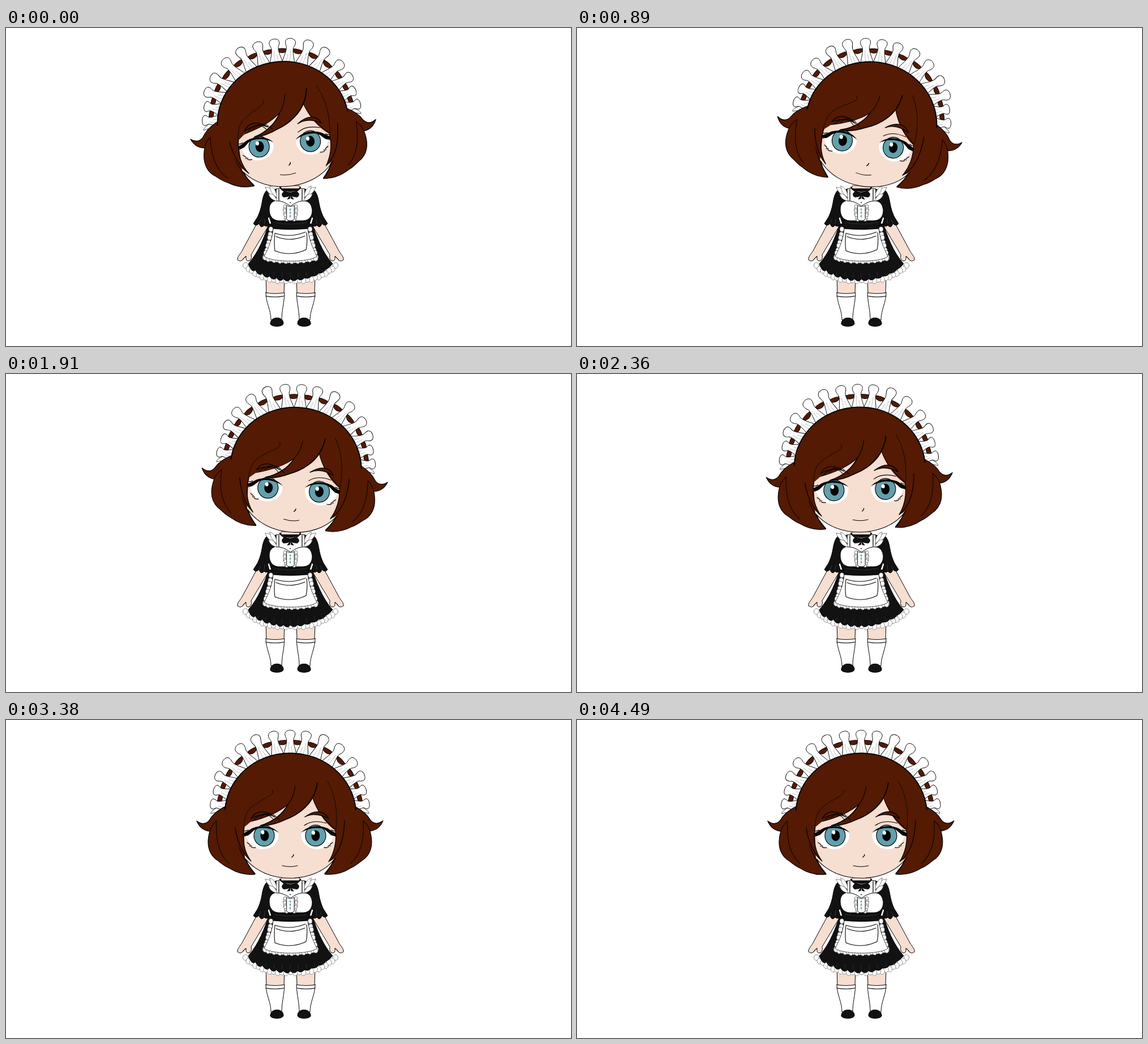
These frames come from a looping animation (998x561 px, 4550 ms). An HTML page:

```html
<!DOCTYPE html>
<html lang="en">
<head>
<meta charset="utf-8">
<title>Maid</title>
<style>
html, body { margin: 0; width: 100%; height: 100%; overflow: hidden; background: #fff; }
svg { display: block; width: 100vw; height: 100vh; }
</style>
</head>
<body>
<svg id="stage" viewBox="0 0 998 561" stroke-linecap="round" stroke-linejoin="round"></svg>
<script>
const BROWN = '#541a03', SKIN = '#f6ded1', TEAL = '#62a0ad', INK = '#060404', CLOTH = '#121212';

const shape = (d, fill, width = 0, stroke = INK) =>
  `<path d="${d}" fill="${fill}" stroke="${width ? stroke : 'none'}" stroke-width="${width}"/>`;
const line = (d, width = 1, stroke = INK) => shape(d, 'none', width, stroke);
const oval = (x, y, rx, ry, fill, width = 0) =>
  `<ellipse cx="${x}" cy="${y}" rx="${rx}" ry="${ry}" fill="${fill}" stroke="${width ? INK : 'none'}" stroke-width="${width}"/>`;
const flip = (sum, s) => `<g transform="translate(${sum}) scale(-1 1)">${s}</g>`;
const pair = (sum, s) => s + flip(sum, s);
const mix = (a, b, p) => [a[0] + (b[0] - a[0]) * p, a[1] + (b[1] - a[1]) * p];

// Scalloped strip along a quadratic curve
function ruffle(a, c, b, n, r, stroke) {
  let s = '';
  for (let i = 0; i <= n; i++) {
    const p = i / n;
    const [x, y] = mix(mix(a, c, p), mix(c, b, p), p);
    s += `<ellipse cx="${x.toFixed(1)}" cy="${(y + (i % 2) * 1.5).toFixed(1)}" rx="${r}" ry="${r * 1.15}" fill="#fff" stroke="${stroke}" stroke-width=".8"/>`;
  }
  return s;
}

// Headband: base and tip of each fold, from the top down to the left
const folds = [
  [[502, 60], [502, 18]], [[480, 62], [471, 20]], [[458, 69], [438, 27]], [[437, 80], [409, 44]],
  [[420, 96], [384, 71]], [[405, 113], [370, 96]], [[396, 132], [367, 122]], [[390, 152], [361, 147]]
];

function fold([b, t]) {
  const L = Math.hypot(t[0] - b[0], t[1] - b[1]);
  const turn = Math.atan2(t[0] - b[0], b[1] - t[1]) * 180 / Math.PI;
  const y = k => (-k * L).toFixed(1);
  const d = `M-11 0C-9 ${y(.25)} -6 ${y(.4)} -6 ${y(.58)}C-6 ${y(.68)} -9 ${y(.7)} -9 ${y(.84)}` +
    `C-9 ${y(1.04)} 8 ${y(1.06)} 9 ${y(.86)}C9 ${y(.72)} 6 ${y(.7)} 6 ${y(.58)}C6 ${y(.4)} 9 ${y(.25)} 11 0`;
  return `<g transform="translate(${b}) rotate(${turn})">${shape(d, '#fff', .9)}` +
    line(`M-2 ${y(.05)}Q-3 ${y(.3)} -2 ${y(.5)}M4 ${y(.05)}L2 ${y(.34)}`, .5, '#888') + '</g>';
}

function gap(f, g) {
  const b = mix(f[0], g[0], .5), t = mix(f[1], g[1], .5), [x, y] = mix(b, t, .5);
  const turn = Math.atan2(t[0] - b[0], b[1] - t[1]) * 180 / Math.PI;
  return `<g transform="translate(${x} ${y}) rotate(${turn})">` +
    shape('M-9 -3Q0 -5 9 -3C9 6 -9 6 -9 -3Z', BROWN, 1) + '</g>';
}

function headband() {
  const side = folds.slice(1).map((f, i) => gap(folds[i], f)).join('') + folds.slice(1).map(fold).reverse().join('');
  const tail = shape('M384 148C366 158 361 162 362 165L370 163L368 168L377 165L386 172Z', '#fff', .7);
  return shape('M372 164C368 95 430 40 502 40C574 40 635 95 631 164Z', '#fff') +
    pair(1003, tail + side) + fold(folds[0]);
}

function eye() {
  return shape('M424 204C432 190 470 182 481 198C484 214 472 228 453 228C437 227 428 218 424 204Z', '#fff') +
    oval(456, 204, 18, 18.5, TEAL, 1.2) +
    shape('M415 200C422 200 428 195 435 191C448 185 470 185 482 199C470 191 452 188 441 193C434 197 431 203 426 204C422 205 418 203 415 200Z', INK) +
    line('M417 195Q423 197 428 194M421 205L427 202', 1.3) +
    line('M426 216L431 220M430 222L434 222M433 224Q437 226 441 225', 1.2);
}

function head() {
  const dome = 'M387 158C391 103 440 58.5 502 58.5C564 58.5 613 103 618 158';
  const halfBack = 'M502 60C440 60 392 104 388 152C372 160 364 168 359 177C352 185 344 183 337 178' +
    'C342 190 350 195 360 196C355 214 355 232 370 245C378 250 384 257 394 261C408 270 424 274 440 272C432 264 427 256 424 244L502 240Z';
  const curls = line('M372 178C370 210 375 236 394 253M360 196Q363 186 372 178', 1) +
    line('M402 180C404 208 414 240 440 271', 1.2);
  const jaw = 'M420 185L422 243C440 266 470 279 502 279C534 279 565 266 581 243L583 185L560 130L420 160Z';
  const front = dome + 'C615 185 612 200 604 215C596 232 585 243 570 250' +
    'C579 236 585 215 582 195C566 184 550 164 542 138C532 157 514 168 493 176C478 183 464 187 450 186' +
    'C470 180 488 167 498 149C483 162 460 172 433 179L421 189C416 212 422 235 433 249C415 235 405 215 400 190Z';
  const brow = 'M433 174C441 160 456 157 475 171C462 164 448 166 433 174Z';
  return headband() +
    pair(1003, shape(halfBack, BROWN, 1.2) + curls) +
    shape(jaw, SKIN) + line('M424 246C442 267 470 279 502 279C534 279 563 267 580 246', 1.1) +
    pair(1003, eye()) +
    oval(457, 204, 7.5, 9.5, INK) + oval(547, 204, 7.5, 9.5, INK) +
    oval(453.5, 198, 3, 3.6, '#fff') + oval(543, 199, 3, 3.6, '#fff') +
    line('M527 186Q542 175 566 182', 1.1) +
    shape(front, BROWN) +
    line(dome, 2) +
    line('M421 189C416 212 422 235 433 249C417 235 408 212 405 190M582 195C585 215 579 236 570 250C588 236 597 214 598 178', 1.3) +
    line('M550 111C546 143 521 166 493 176C478 183 464 187 450 186C472 180 490 165 498 149', 1.8) +
    line('M542 138Q552 168 582 193M511 117C509 132 505 141 498 149C483 162 460 172 433 179', 1.1) +
    line('M470 123C480 134 446 138 428 160Q420 172 420 195M568 108C582 134 586 160 583 193', .8) +
    pair(1003, shape(brow, BROWN, 1.4)) +
    line('M438 177Q452 161 472 166L483 176M448 173Q460 160 472 175', 1) +
    line('M508 237.5Q508 240 505 242', 1.5) +
    line('M488 257Q502 260.5 515 257', 1);
}

function body() {
  const arm = shape('M444 343L417 393C413 400 408 404 409 409Q414 413 418 409Q423 402 424 403' +
    'Q423 411 428 411Q435 410 433 400L463 350Z', SKIN, 1) +
    line('M418 409Q421 404 424 403', 1);
  const leg = shape('M459 436L460 470L491 470L492 436Z', SKIN, 1) +
    shape('M459 467Q475 470 492 467C491 488 487 498 487 515L468 515C468 497 459 485 459 467Z', '#fff', 1) +
    line('M459 473Q475 476 491 473', 1.2) +
    shape('M467 522C466 508 490 508 490 521C490 528 468 528 467 522Z', CLOTH, 1);
  const sleeve = shape('M470 283C458 282 454 296 452 309C450 320 447 328 444 334L437 345Q441 351 447 345Q450 355 456 348' +
    'Q461 353 465 345L462 335L472 330V300Z', CLOTH, 1) +
    line('M450 338Q448 342 447 345M457 337L456 346', .7, '#444');
  const feather = ['M458 281C466 280 472 286 475 295C467 295 461 290 458 281Z',
    'M466 279C473 281 478 287 478 299C471 294 467 288 466 279Z',
    'M464 293C470 291 476 296 479 305C471 304 466 300 464 293Z']
    .map(d => shape(d, '#fff', .8, '#666')).join('');
  const bow = shape('M502 293C494 288 490 288 488 292C487 297 490 299 493 298C497 298 499 297 502 295Z', CLOTH, 1) +
    shape('M502 295L497 302L501 301Z', CLOTH, 1);
  const placket = ruffle([493, 315], [491, 326], [496, 338], 6, 2.8, '#555');
  const edge = ruffle([468, 355], [464, 382], [457, 403], 7, 3.8, '#555');
  const frill = ruffle([423, 419], [456, 449], [502, 444], 12, 4.5, '#777');

  let hem = 'M464 346C457 366 447 395 428 416';
  for (let i = 1; i <= 12; i++) {
    const x = 428 + 149 * i / 12, y = 416 + 27 * Math.sin(Math.PI * i / 12) ** .7;
    hem += `Q${(x - 6).toFixed(1)} ${(y + 7).toFixed(1)} ${x.toFixed(1)} ${y.toFixed(1)}`;
  }
  hem += 'C558 395 548 366 541 346Z';
  let pleats = '';
  for (let i = 0; i < 9; i++) {
    const x = 446 + i * 14, bend = Math.sin((i + 1) * .314);
    pleats += `M${x} ${424 + 8 * bend}L${x + (x - 502) * .05} ${430 + 10 * bend}`;
  }

  return pair(1005, leg + arm + frill) +
    shape(hem, CLOTH, 1) + line(pleats, .7, '#333') +
    pair(1005, sleeve) +
    shape('M487 278L518 278L521 286Q502 295 484 286Z', SKIN, .8) +
    shape('M468 285L484 283L521 283L537 285L540 335L534 353L471 353L465 335Z', CLOTH) +
    shape('M477 284L484 283Q502 294 521 283L528 284L528 305Q539 306 541 321C541 334 534 340 524 340L481 340C471 339 465 332 465 320C465 309 471 306 477 304Z', '#fff', 1) +
    pair(1005, line('M477 284L477 304M482 285L482 304', 1.3) + line('M477 305Q489 304 502 314', 1) + feather) +
    pair(1005, placket) +
    shape('M496 313Q502 317 509 313L509 338Q502 342 496 338Z', '#fff', .8) +
    line('M502 318L502 335', .8, '#78a7b2') +
    [320, 326, 332].map(y => oval(502, y, 1.5, 1.3, TEAL)).join('') +
    oval(502, 308, .9, .9, INK) +
    shape('M469 339Q502 346 536 339L534 353Q502 356 471 353Z', CLOTH, 1) +
    line('M474 343Q502 349 531 343', .5, '#444') +
    line('M484 281Q490 290 502 291Q515 290 520 281', 2.4, CLOTH) + pair(1005, bow) +
    oval(502.5, 294, 2.5, 3, CLOTH) +
    pair(1005, edge) + ruffle([458, 405], [502, 415], [547, 405], 17, 4, '#777') +
    shape('M472 354Q502 357 533 354C536 376 542 388 549 403C536 414 470 414 456 403C464 387 470 374 472 354Z', '#fff', .7) +
    line('M475 362Q473 380 475 393Q502 404 530 391Q533 378 531 361M475 362Q502 371 529 360M477 368Q502 378 528 367', 1.1);
}

const stage = document.getElementById('stage');
stage.innerHTML = `<rect width="998" height="561" fill="#fff"/>${body()}<g id="head">${head()}</g>`;
const headNode = document.getElementById('head');

// Swing of the head: seconds and degrees at each turning point
const LOOP = 4550, HOLD = 560;
const swing = [[0, -6.1], [.39, 8.9], [.84, -3.2], [1.3, 4.6], [1.74, -1.6], [2.2, 2.3],
  [2.62, -1], [3.07, 1.3], [3.5, -.4], [4.1, 0]];
const beats = [0, 60, 120, 180, 210, 270, 330, 390];

function angle(ms) {
  // the pose starts moving on the first beat after the hold
  if (ms < HOLD) return swing[0][1];
  const u = ms - HOLD, bar = Math.floor(u / 450) * 450;
  const s = (bar + beats.filter(b => b <= u - bar).pop()) / 1000 || .03;
  const i = swing.findIndex(k => k[0] > s);
  const [t0, a] = swing[i - 1], [t1, b] = swing[i];
  return a + (b - a) * (1 - Math.cos(Math.PI * (s - t0) / (t1 - t0))) / 2;
}

function draw() {
  headNode.setAttribute('transform', `rotate(${angle(performance.now() % LOOP).toFixed(3)} 502 290)`);
  requestAnimationFrame(draw);
}
draw();
</script>
</body>
</html>
```
